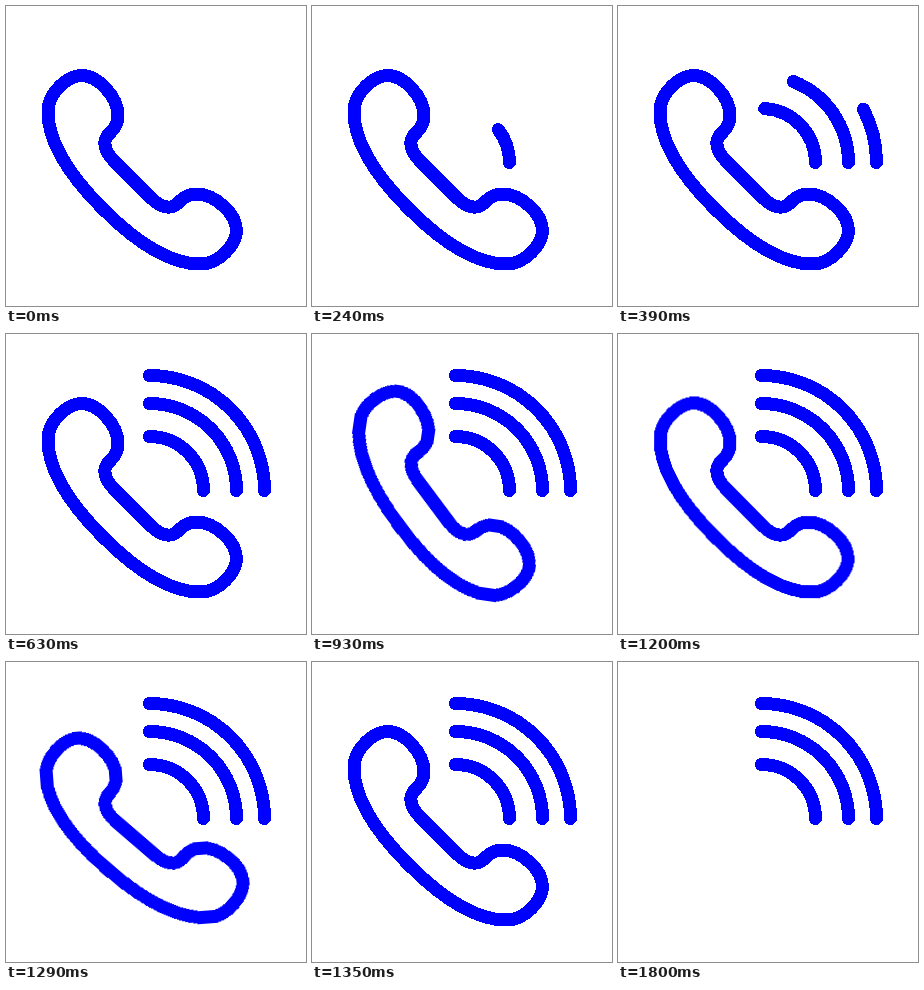
Write an HTML page without scripts that moves like this. It is 300 by 300 pixels and loops after 1.83 s.

```html
<!DOCTYPE html>
<html lang="en">
<head>
<meta charset="utf-8">
<title>Ringing phone</title>
<style>
  html, body { margin: 0; width: 100%; height: 100%; overflow: hidden; background: #fff; }
  svg { display: block; width: 100%; height: 100%; shape-rendering: crispEdges; }
  path {
    fill: none;
    stroke: #00f;
    stroke-width: 13;
    stroke-linecap: round;
    stroke-linejoin: round;
    animation: 1.83s linear infinite;
  }
  .wave { stroke-dasharray: 1 2; animation-timing-function: ease; }
  .near { animation-name: near; }
  .mid { animation-name: mid; }
  .far { animation-name: far; }
  .phone { transform-origin: 164px 136px; animation-name: ring, blink; }

  /* each wave is drawn from its lower end in 300 ms */
  @keyframes near {
    0%, 9% { stroke-dashoffset: 1; visibility: hidden; }
    25.4%, 100% { stroke-dashoffset: 0; visibility: visible; }
  }
  @keyframes mid {
    0%, 13.8% { stroke-dashoffset: 1; visibility: hidden; }
    30.2%, 100% { stroke-dashoffset: 0; visibility: visible; }
  }
  @keyframes far {
    0%, 18% { stroke-dashoffset: 1; visibility: hidden; }
    34.4%, 100% { stroke-dashoffset: 0; visibility: visible; }
  }

  /* three quick shakes of 150 ms */
  @keyframes ring {
    0%, 49.18%, 73.77%, 100% { transform: rotate(0deg); }
    51.23%, 59.43%, 67.62% { transform: rotate(10deg); }
    55.33%, 63.52%, 71.72% { transform: rotate(-10deg); }
  }
  @keyframes blink {
    0%, 98.35% { opacity: 1; }
    98.36%, 100% { opacity: 0; }
  }
</style>
</head>
<body>
<svg viewBox="0 0 300 300">
  <path class="phone" d="M75.5 69.5
    C92 69.5 112 91 112 109
    C112 117 109.5 121 105 126
    C99 131 97.5 136 100 143
    C102 149 106 153 112 159
    L141 188
    C147 194 151 198 157 200
    C164 202.5 169 201 174 195
    C179 190.5 183 188 191 188
    C209 188 230.5 208 230.5 224.5
    C230.5 234 225 241 219.5 246.5
    C212 254 204 258 194 258
    C157 258 120 226 97 203
    C74 180 42 143 42 106
    C42 96 46 88 53.5 80.5
    C59 75 66 69.5 75.5 69.5Z"/>
  <path class="wave near" pathLength="1" d="M197.5 156.5A54 54 0 0 0 143.5 102.5"/>
  <path class="wave mid" pathLength="1" d="M230.5 156.5A87 87 0 0 0 143.5 69.5"/>
  <path class="wave far" pathLength="1" d="M258.5 156.5A115 115 0 0 0 143.5 41.5"/>
</svg>
</body>
</html>
```
